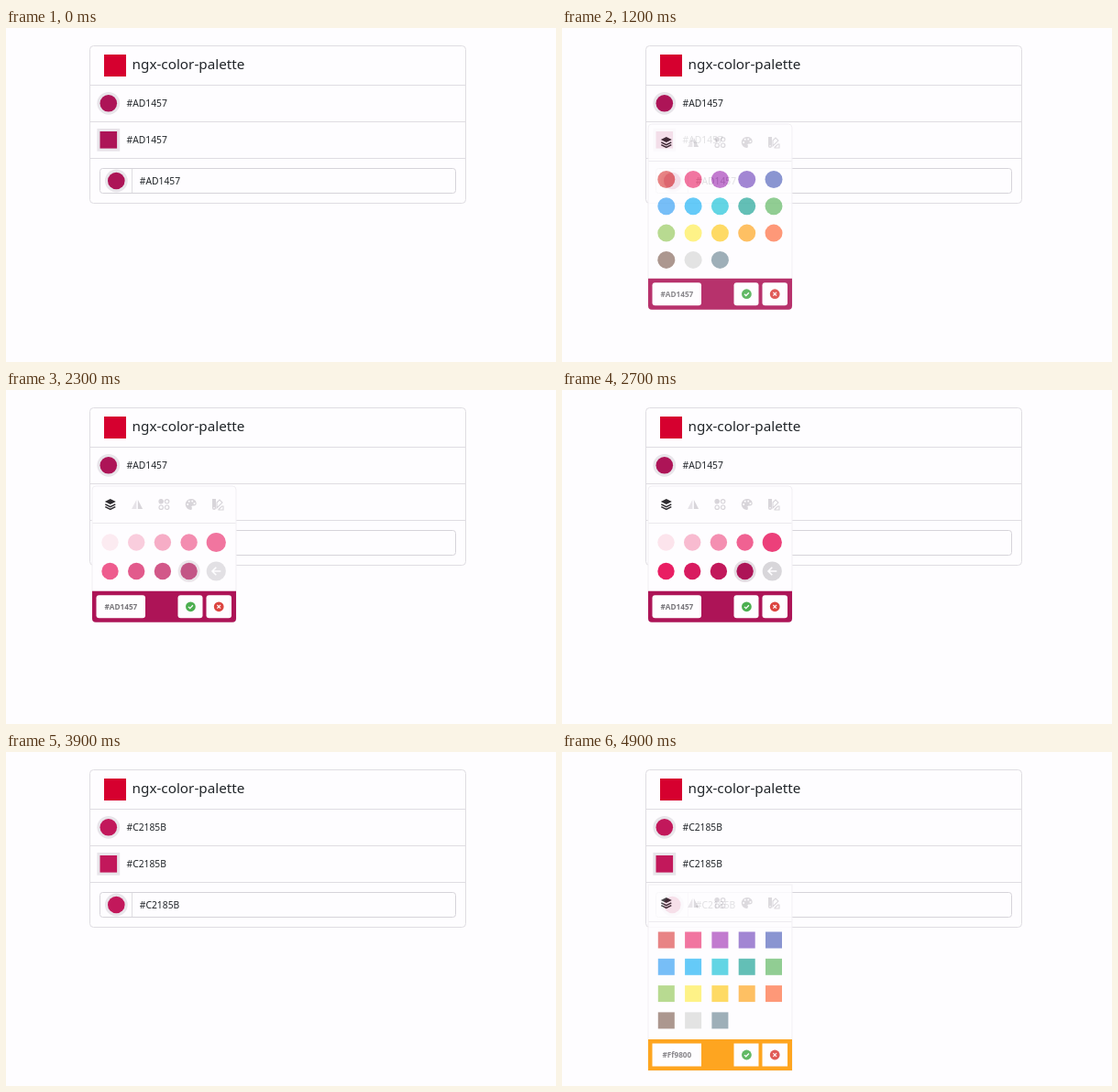
These frames come from a looping animation (600 by 365 pixels, 5000 ms). An HTML page:

```html
<!DOCTYPE html>
<html lang="en">
<head>
<meta charset="utf-8">
<title>ngx-color-palette</title>
<style>
html, body { margin: 0; width: 100%; height: 100%; overflow: hidden; background: #fefdff; }
svg { display: block; width: 600px; height: 365px; }
text { font-family: "Noto Sans", "Open Sans", sans-serif; font-size: 10.3px; fill: #212529; }
.title { font-size: 15.25px; font-weight: 500; }
.hex { font-size: 8.2px; font-weight: 600; fill: #77757a; text-anchor: middle; }
</style>
</head>
<body>
<svg id="stage" viewBox="0 0 600 365"></svg>
<script>
const LOOP = 5000, STEP = 100;
const BG = '#fefdff', LINE = '#dfdde2', RING = '#e8e5ea', OFF = '#d8d5da';
const OLD = '#AD1457', NEW = '#C2185B';
const BASE = ['#e57373', '#f06292', '#ba68c8', '#9575cd', '#7986cb', '#64b5f6', '#4fc3f7', '#4dd0e1', '#4db6ac',
  '#81c784', '#aed581', '#fff176', '#ffd54f', '#ffb74d', '#ff8a65', '#a1887f', '#e0e0e0', '#90a4ae'];
const SHADES = ['#fce4ec', '#f8bbd0', '#f48fb1', '#f06292', '#ec407a', '#e91e63', '#d81b60', NEW, OLD];

const rect = (x, y, w, h, r, fill, stroke = 'none') =>
  `<rect x="${x}" y="${y}" width="${w}" height="${h}" rx="${r}" fill="${fill}" stroke="${stroke}"/>`;
const circle = (x, y, r, fill) => `<circle cx="${x}" cy="${y}" r="${r}" fill="${fill}"/>`;
const square = (x, y, r, fill) => rect(x - r, y - r, 2 * r, 2 * r, 0, fill);
const path = (d, fill, stroke = 'none', width = 1) =>
  `<path d="${d}" fill="${fill}" stroke="${stroke}" stroke-width="${width}"/>`;
const line = (d, color = LINE) => path(d, 'none', color);
const text = (x, y, s, cls = '') => `<text x="${x}" y="${y}" class="${cls}">${s}</text>`;
const group = (x, y, body, opacity = 1) =>
  `<g transform="translate(${x} ${y})" opacity="${opacity}">${body}</g>`;

// Opacity of something that appears at time start
const fade = (t, start) => 1 - Math.max(0, 0.7 - 0.17 * (t - start) / STEP) ** 2;

function card(color) {
  const swatch = (shape, x, y) => shape(x, y, 12.4, RING) + shape(x, y, 9.3, color);
  return rect(91.5, 19.5, 410, 172, 4, BG, LINE) +
    line('M92 62.5H501M92 102.5H501M92 142.5H501') +
    rect(107, 29, 24, 24, 0, '#d6002f') +
    text(137.6, 45, 'ngx-color-palette', 'title') +
    swatch(circle, 111.8, 82.3) + text(131.5, 86, color) +
    swatch(square, 111.8, 122.3) + text(131.5, 126, color) +
    rect(102.5, 153.5, 388, 27, 3, BG, '#d6d4da') + line('M137.5 154V180') +
    swatch(circle, 120.3, 167) + text(145.8, 171, color);
}

function icons() {
  const dark = '#2f2d31';
  const layers = path('M0-6L6-3L0 0L-6-3Z', dark) +
    path('M-5.5-.2L0 2.6L5.5-.2M-5.5 2.6L0 5.4L5.5 2.6', 'none', dark, 1.5);
  const mirror = path('M-.8-5V5H-6Z', '#e6e3e8') + path('M.8-5V5H6Z', OFF);
  const dots = [[-3.2, -3.2], [3.2, -3.2], [-3.2, 3.2], [3.2, 3.2]].map(([x, y], i) =>
    `<circle cx="${x}" cy="${y}" r="2.2" fill="${i ? 'none' : OFF}" stroke="${OFF}" stroke-width="1.2"/>`).join('');
  const palette = path('M0-6A6 6 0 1 0 0 6C2 6 1-0 0 3C0 2 1 1.5 3 1.5C5 1.5 6 .5 6-1C6-4 3.5-6 0-6Z', OFF) +
    [[-3.5, 0], [-2, -3.2], [1.5, -3.4], [3.8, -1]].map(([x, y]) => circle(x, y, 1, BG)).join('');
  const fan = path('M-6-6H-2V4A2 2 0 0 1-6 4Z', OFF) +
    path('M-1-2L2-5L5-2L-1 4ZM1 5.5L4.5 2H6V6H1Z', 'none', OFF, 1.1) + circle(-4, 3.8, 0.8, BG);
  return [layers, mirror, dots, palette, fan]
    .map((icon, i) => group(113.8 + 29.3 * i, 20, icon)).join('');
}

function footer(y, color, round) {
  const r = round ? 3 : 0;
  const c = round ? 4 : 0;
  return path(`M94 ${y}H251V${y + 34 - c}q0 ${c}-${c} ${c}H${94 + c}q-${c} 0-${c}-${c}Z`, color) +
    rect(98.5, y + 4.5, 53.5, 25, r, BG) + rect(187.5, y + 4.5, 27, 25, r, BG) +
    rect(218.5, y + 4.5, 27.5, 25, r, BG) +
    text(125.4, y + 20, color, 'hex') +
    group(201.4, y + 17, circle(0, 0, 5.4, '#4caf50') + path('M-2.4 .1L-.7 1.8L2.5-1.5', 'none', BG, 1.3)) +
    group(232.2, y + 17, circle(0, 0, 5.4, '#dc4540') + path('M-1.8-1.8L1.8 1.8M1.8-1.8L-1.8 1.8', 'none', BG, 1.2));
}

function popup(top, height, grid, color, round, opacity) {
  return group(0, top, rect(94, 0, 157, height, round ? 4 : 0, BG, '#f1eff3') +
    icons() + line('M94.5 40.5H250.5', '#ebe9ed') + grid + footer(height - 34, color, round), opacity);
}

const baseGrid = shape => BASE.map((c, i) =>
  shape(113.8 + 29.3 * (i % 5), 60.5 + 29.3 * Math.floor(i / 5), shape === circle ? 9.5 : 9, c)).join('');

function shadeGrid(t) {
  const chosen = t < 3200 ? 8 : 7;
  const hovered = t < 3000 ? 4 : 7;
  const at = i => [113.5 + 28.7 * (i % 5) + (i % 5 === 4 ? 1 : 0), i < 5 ? 61.5 : 93];
  const swatches = SHADES.map((c, i) =>
    (i === chosen ? circle(...at(i), 12, '#e4dde3') : '') +
    circle(...at(i), i === hovered && i !== chosen ? 10.6 : 9.2, c)).join('');
  const back = group(...at(9), circle(0, 0, 10.6, '#d8d6da') +
    path('M5 0H-4M0-4.3L-4.3 0L0 4.3', 'none', BG, 1.6));
  return group(0, 0, swatches + back, fade(t, 2200));
}

function scene(t) {
  let out = card(t < 3900 ? OLD : NEW);
  if (t >= 1000 && t < 2200) out += popup(105, 202.7, baseGrid(circle), OLD, true, fade(t, 1000));
  else if (t >= 2200 && t < 3900) out += popup(105, 148.8, shadeGrid(t), t < 3200 ? OLD : NEW, true, 1);
  else if (t >= 4700) out += popup(145, 203, baseGrid(square), '#Ff9800', false, fade(t, 4700));
  return out;
}

const stage = document.getElementById('stage');
const start = performance.now();
let shown = -1;
function draw() {
  const t = Math.floor((performance.now() - start) % LOOP / STEP) * STEP;
  if (t !== shown) stage.innerHTML = scene(shown = t);
  requestAnimationFrame(draw);
}
draw();
</script>
</body>
</html>
```
